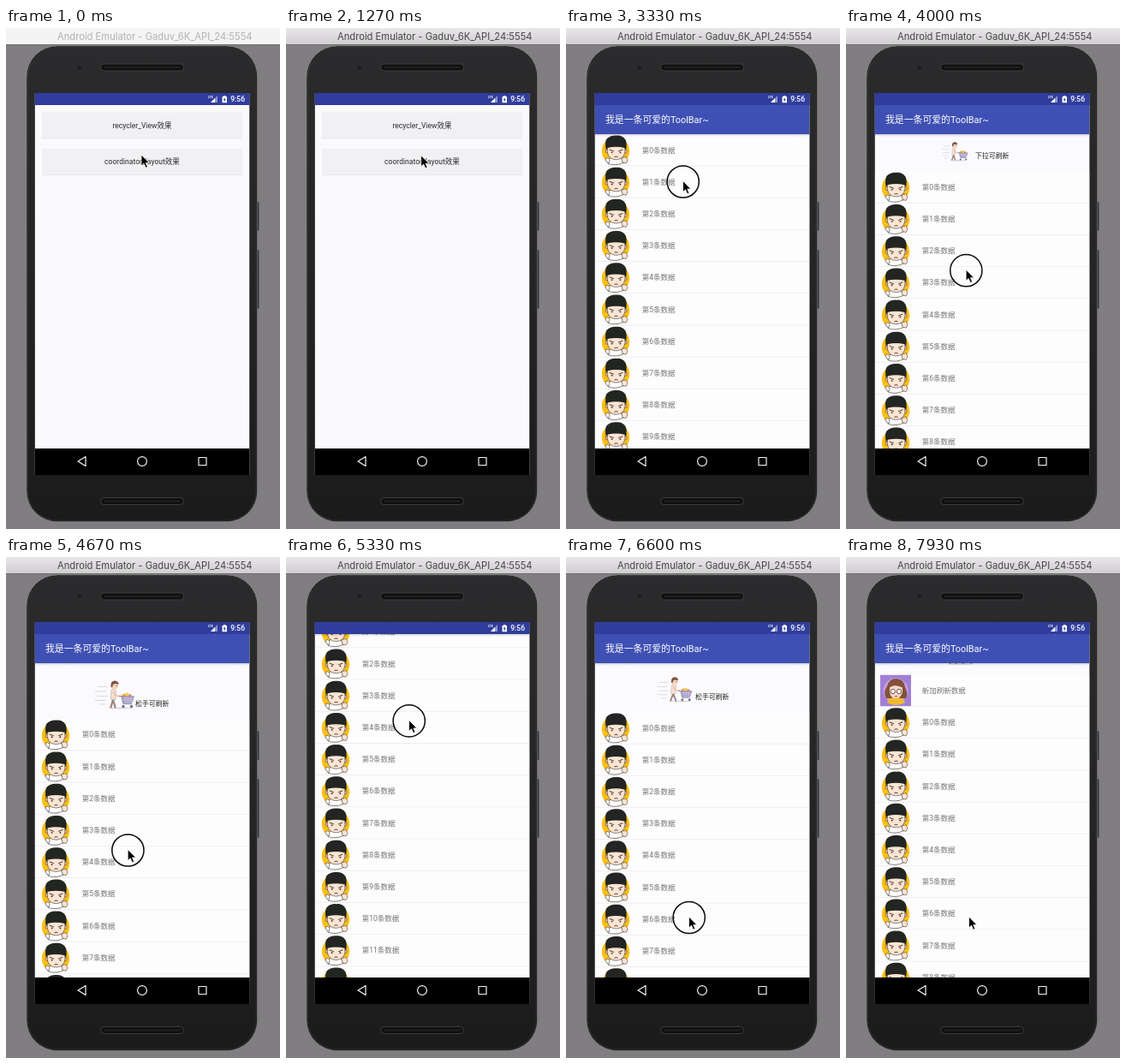
Write an HTML page that moves like this. It is 320 by 585 pixels and loops after 8000 ms.

```html
<!DOCTYPE html>
<html lang="zh">
<head>
<meta charset="utf-8">
<title>Pull to refresh</title>
<style>
html, body { margin: 0; width: 100%; height: 100%; overflow: hidden; background: #7f7d7f; }
svg { display: block; width: 100vw; height: 100vh; }
text { font-family: Roboto, "Noto Sans CJK SC", "Noto Sans CJK", sans-serif; }
.title { font: 11.2px Inter, sans-serif; }
.btn { font-size: 8.55px; fill: #2c2c2e; text-anchor: middle; }
.row { font-size: 8.5px; fill: #757575; }
</style>
</head>
<body>
<svg id="stage" viewBox="0 0 320 585"></svg>
<script>
const LOOP = 8000, PITCH = 37.2, TOP = 124, BAR = 34;
const ACTIVE = 470, CLICK = 1530, OPEN = 2120, GRAB = 3250, RELEASE = 6720, INSERT = 7730;
const PRESSES = [[430, 560], [CLICK, 1700], [GRAB, RELEASE]];
const TURN_UP = 4700, TURN_DOWN = 5800;
const CURSOR = [
  [0, 158, 148], [900, 158, 148], [1500, 157.5, 149], [1960, 157, 149.5],
  [2200, 147, 153.5], [2750, 136.5, 178.5], [3350, 136.5, 178.5],
  [4450, 142.2, 341.5], [TURN_UP, 142.2, 341.5], [5720, 144.2, 117.5],
  [5880, 144.2, 117.5], [6560, 143.5, 420]
];

const clamp = (v, a = 0, b = 1) => Math.min(b, Math.max(a, v));
const ease = u => u * u * (3 - 2 * u);
const $ = id => document.getElementById(id);
const set = (id, attrs) => {
  for (const k in attrs) $(id).setAttribute(k, attrs[k]);
};
const display = (id, on) => { $(id).style.display = on ? '' : 'none'; };
const rect = (x, y, w, h, fill, more = '') =>
  `<rect x="${x}" y="${y}" width="${w}" height="${h}" fill="${fill}" ${more}/>`;
const screenRect = (y, h, fill, more) => rect(33.6, y, 250.9, h, fill, more);
const path = (d, fill, more = '') => `<path d="${d}" fill="${fill}" ${more}/>`;
const dot = (x, y, r, fill, more = '') =>
  `<circle cx="${x}" cy="${y}" r="${r}" fill="${fill}" ${more}/>`;
const grad = (id, ...stops) =>
  `<linearGradient id="${id}" x2="0" y2="1">${stops.map((c, i) =>
    `<stop offset="${i / (stops.length - 1)}" stop-color="${c}"/>`).join('')}</linearGradient>`;
const clip = (id, y, h) => `<clipPath id="${id}">${screenRect(y, h, '#000')}</clipPath>`;

const INK = 'stroke="#3a322c" stroke-width=".6" stroke-linejoin="round"';
const LINE = 'stroke="#2a2520" stroke-width=".9" stroke-linecap="round"';

const boy = `<g id="boy">
  ${dot(0, 1, 16.2, '#fbbf16')}
  ${path('M-9 16Q-10 10-5 9H5Q9 10 9 15Q0 19-9 16Z', '#fff', INK)}
  ${dot(-10, 1.5, 1.9, '#f8d5bb', INK)}${dot(11.2, 1.5, 1.9, '#f8d5bb', INK)}
  ${path('M-9.6-6H10.8V3Q9 11 .5 11.2Q-8 11-9.6 3Z', '#fbe4d2', INK)}
  ${path('M-11.3 0Q-13-9-10.5-13Q-6-17.5 1-17Q8-17.5 11.5-12Q13.5-8 12.2 0L10.5-2.6Q0-5-9.5-2.6Z', '#232523')}
  ${path('M-7-.4L-2.5 1.3M8-.4L3.5 1.3M-1.2 8Q.5 6.8 2.2 8', 'none', LINE)}
  ${dot(-4.4, 2.8, .9, '#2a2520')}${dot(5.4, 2.8, .9, '#2a2520')}
  ${path('M7 10Q8 7 10 9Q12 6 13 10Q15 11.5 12 15.5L8 14.5Z', '#fbe4d2', INK)}
  ${path('M-12 10Q-9 8-7 11L-8 15.5L-11 13.5Z', '#fff', INK)}</g>`;

const girl = `<g id="girl">
  ${rect(-18, -18.3, 36, 36.4, '#a17fd6')}
  ${dot(0, 0, 14.5, '#c3a1df')}
  ${path('M-11 9Q-15 2-10-5Q-8-14 1-14Q10-13 11-4Q15 3 12 9Z', '#82513a')}
  ${path('M-10 14Q-8 7 0 8Q9 7 11 14Q0 20-10 14Z', '#f2b92f')}
  ${path('M-7-4Q0-8 8-4V2Q6 9 0 9Q-6 9-7 2Z', '#f8d8c4')}
  ${path('M-8-3Q-3-9 9-3L8-8Q0-13-7-8Z', '#82513a')}
  <g stroke="#4b332b" stroke-width=".8">${dot(-3.3, 1, 2.7, '#fff')}${dot(4, 1, 2.7, '#fff')}
  ${path('M-1 6.4Q.5 7.2 2 6.4', 'none')}</g></g>`;

// Feet stand on y = 0.
const shopper = `<g id="shopper">
  <ellipse cx="7" cy="0" rx="14" ry=".8" fill="#d5d4d8"/>
  ${path('M-20-25H-9M-23-19.5H-10M-21-14H-8M-23-9H-10M-18-4.5H-11', 'none', 'stroke="#cfced4" stroke-width=".8"')}
  ${path('', 'none', 'id="legs" stroke="#9a8680" stroke-width="2.2" stroke-linejoin="round" stroke-linecap="round"')}
  ${path('M-4-21.5Q-1-23 1.5-20.5L1-10H-5Z', '#f3e0d8', 'stroke="#b79b92" stroke-width=".5"')}
  ${path('M-1.5-18.5L1-14.5L6-14', 'none', 'stroke="#efb999" stroke-width="1.6" stroke-linecap="round"')}
  ${dot(0, -26, 4.1, '#f9d4bb')}
  ${path('M-4.6-25Q-5-32.5 .5-32Q4.6-31.5 4.6-27.5Q1-29.5-2-27.5L-3-24Z', '#7d5442')}
  ${dot(2.2, -26, .6, '#4a3630')}
  ${dot(11, -14.8, 2.2, '#f0a63a')}${dot(14.6, -15.6, 2.3, '#f6c95e')}${dot(18, -14.4, 1.8, '#e9816a')}
  ${path('M5-14H8L10-5H20', 'none', 'stroke="#80799c" stroke-width="1"')}
  ${path('M8-13.6H22.5L20-6.4H10Z', '#aaa2cb', 'stroke="#7b7399" stroke-width=".6"')}
  ${path('M9-11.2H21.5M9.5-8.8H20.8M12-13.6V-6.4M15.3-13.6V-6.4M18.6-13.6V-6.4', 'none', 'stroke="#d9d4ea" stroke-width=".5"')}
  ${dot(10, -2, 1.6, '#6b6485')}${dot(19.5, -2, 1.6, '#6b6485')}</g>`;

const row = (y, art, label) => `<g transform="translate(0 ${y})">
  <use href="#${art}" x="58"/><text class="row" x="88.8" y="3">${label}</text>
  ${screenRect(18.2, .6, '#e6e5e9')}</g>`;
const rows = Array.from({ length: 16 }, (_, i) => row(18.5 + i * PITCH, 'boy', `第${i}条数据`)).join('');

const button = (id, y, label) => `
  ${rect(42, y + .6, 234, 30.2, '#e4e3e7', 'rx="1"')}
  ${rect(42, y, 234, 30, '#f1f0f3', `id="${id}" rx="1"`)}
  <text class="btn" x="159" y="${y + 18.2}">${label}</text>`;

const speaker = y => rect(110.5, y, 97, 8, '#101011', 'rx="4" stroke="#424244" stroke-width=".9"') +
  rect(114, y + 3, 90, 2, '#1f1f20', 'rx="1"');
const sideKey = (y, h) => rect(293, y, 2.6, h, '#2b2b2d', 'rx="1" stroke="#8c8a8c" stroke-width=".4"');

const phone = `
  ${sideKey(203, 34)}${sideKey(259, 69)}
  ${rect(24, 21, 269.6, 555.6, '#141415', 'rx="36" stroke="#8f8d8f" stroke-width=".6"')}
  ${rect(25.4, 22.4, 266.8, 552.8, 'url(#body)', 'rx="34.6" stroke="#3c3b3d" stroke-width=".7"')}
  ${speaker(42)}${speaker(548.5)}
  ${dot(85.5, 46, 2, '#151519')}${dot(85.5, 46, .8, '#303048')}`;

const home = `${screenRect(76, 446, '#faf9fc')}
  ${screenRect(76, 14, '#303d9c')}
  ${button('first', 98.5, 'recycler_View效果')}
  ${button('second', 141, 'coordinator_layout效果')}
  ${screenRect(491, 31, '#000')}`;

const list = `<g id="page">
  <g clip-path="url(#listBox)">
    ${screenRect(90, 401, '#fbfafd')}
    <g id="list">
      <g id="head"><use id="man" href="#shopper"/>
        <text id="hint" x="151" y="-15.2" font-size="7.9" fill="#222"></text></g>
      ${screenRect(0, 640, '#fefdfe')}
      <g id="fresh">${row(18.5, 'girl', '新加刷新数据')}</g>
      <g id="rows">${rows}</g>
    </g>
    <g id="bar">${screenRect(124, 3, 'url(#shade)')}
      ${screenRect(90, 34, '#3f50b4')}
      <text x="46" y="111" font-size="10.85" fill="#fff">我是一条可爱的ToolBar~</text></g>
  </g>
  ${screenRect(76, 14, '#303d9c')}
  ${screenRect(491, 31, '#000')}</g>`;

const chrome = `
  <text x="236" y="82" font-size="3.6" font-weight="700" fill="#fff">LTE</text>
  ${path('M247 79V87H239Z', '#fff', 'opacity=".45"')}${path('M244 82V87H239Z', '#fff')}
  ${path('M252.5 80H254V79H256.5V80H258V87.3H252.5Z', '#fff')}
  ${path('M255.6 81L253.8 84H255L254.8 86.4L256.8 83.2H255.5Z', '#303d9c')}
  <text x="262.2" y="86.2" font-size="8.6" font-weight="500" fill="#fff">9:56</text>
  <g fill="none" stroke="#f2f2f2" stroke-width="1.2" stroke-linejoin="round">
    <path d="M84 506L93 500.6V511.4Z"/><circle cx="159" cy="506" r="5.4"/>
    <rect x="225" y="501.5" width="9" height="9"/></g>`;

$('stage').innerHTML = `<defs>
    ${grad('body', '#2b2a2c', '#252425', '#1c1b1c')}
    ${grad('bright', '#e9e7e9', '#d0ced0')}
    <linearGradient id="shade" x2="0" y2="1"><stop stop-opacity=".16"/><stop offset="1" stop-opacity="0"/></linearGradient>
    ${clip('screen', 76, 446)}${clip('listBox', 90, 401)}
    ${boy}${girl}${shopper}</defs>
  ${rect(0, 0, 320, 585, '#807e80')}
  ${rect(0, 0, 320, 19, '#f5f4f5', 'id="strip"')}
  ${rect(0, 19, 320, .8, '#6b696b')}
  <text id="title" class="title" x="60" y="14">Android Emulator - Gaduv_6K_API_24:5554</text>
  ${phone}
  <g clip-path="url(#screen)">${home}${list}${chrome}</g>
  <g id="pointer">
    ${dot(.2, 1, 18.6, 'none', 'id="ring" stroke="#0a0a0a" stroke-width="1.5"')}
    ${path('M0 0V13L3 10.3L5.2 15.2L7.4 14.2L5.3 9.5H9.4Z', '#000', 'stroke="#fff" stroke-width=".8"')}
  </g>`;

function pointer(t) {
  const i = CURSOR.findIndex(k => k[0] > t);
  if (i < 0) return CURSOR[CURSOR.length - 1].slice(1);
  const [a, b] = [CURSOR[i - 1], CURSOR[i]];
  const u = ease((t - a[0]) / (b[0] - a[0]));
  return [1, 2].map(n => a[n] + (b[n] - a[n]) * u);
}

// Pulling past the top starts at half speed and gets stiffer.
const pull = d => 200 * (1 - Math.exp(-d / 400));

// The list follows the finger, then settles on the header and closes it.
function offset(t, y) {
  const slop = 6;
  if (t < GRAB) return 0;
  if (t < TURN_UP) return pull(Math.max(0, y - 178.5 - slop));
  if (t < TURN_DOWN) return 64.8 + (y - 341.5) * 1.04;
  if (t < RELEASE) {
    const d = y - 117.5 - 168;
    return d > 0 ? pull(d) : d;
  }
  if (t < INSERT) return 57.3 - 4.3 * ease(clamp((t - RELEASE) / 300));
  return 53 * (1 - clamp((t - INSERT) / 270));
}

function draw(t) {
  const [x, y] = pointer(t), off = offset(t, y);
  const active = t >= ACTIVE, busy = t >= RELEASE, added = t >= INSERT;

  set('strip', { fill: active ? 'url(#bright)' : '#f5f4f5' });
  set('title', { fill: active ? '#474547' : '#b3b1b3' });
  set('second', { fill: t >= CLICK && t < CLICK + 400 ? '#e3e2e6' : '#f1f0f3' });

  const age = t - OPEN;
  display('page', age >= 0);
  set('page', {
    transform: `translate(0 ${35.7 * (1 - clamp(age / 350)) ** 5})`,
    opacity: 1 - (1 - clamp(age / 200)) ** 4
  });
  set('list', { transform: `translate(0 ${TOP + off})` });
  set('bar', { transform: `translate(0 ${clamp(off, -BAR, 0)})` });
  set('rows', { transform: `translate(0 ${added ? PITCH : 0})` });
  display('fresh', added);

  display('head', off > 0);
  const size = busy ? 1 : clamp(off / 64.5);
  set('man', { transform: `translate(127 -12.5) scale(${size})` });
  const step = 3.5 * Math.cos(t / 70);
  set('legs', { d: `M${-2 - step} -1L-2 -10L${-2 + step} -1` });
  $('hint').textContent = busy ? '正在刷新' : off > 48 ? '松手可刷新' : '下拉可刷新';

  set('pointer', { transform: `translate(${x} ${y})` });
  display('ring', PRESSES.some(([a, b]) => t >= a && t < b));
}

const start = performance.now();
function tick() {
  draw((performance.now() - start) % LOOP);
  requestAnimationFrame(tick);
}
tick();
</script>
</body>
</html>
```
